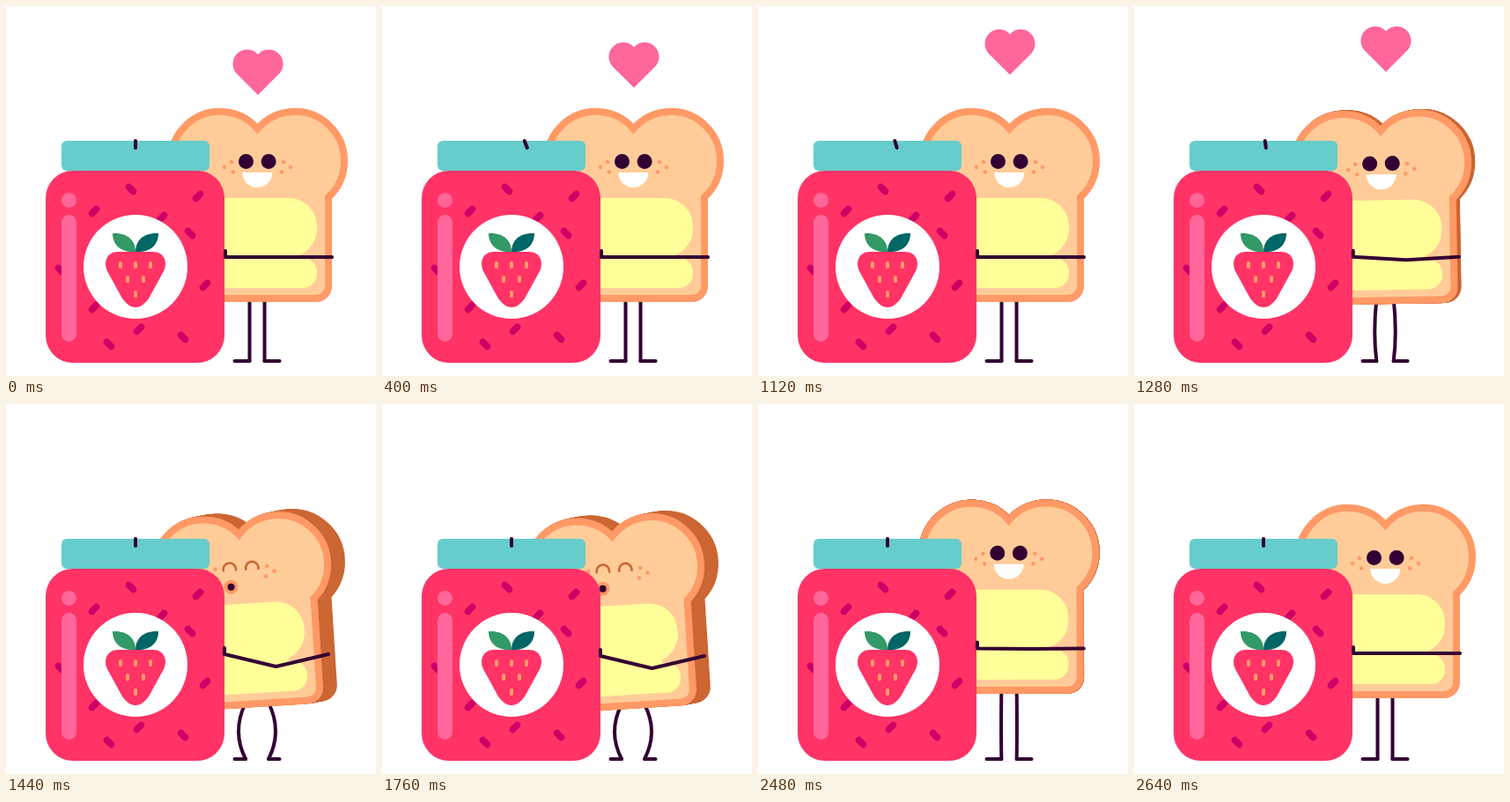
These frames come from a looping animation (420 by 420 pixels, 2.72 s). An HTML page with a canvas:

```html
<!DOCTYPE html>
<html lang="en">
<head>
<meta charset="utf-8">
<title>Toast loves jam</title>
<style>
  html, body { margin: 0; height: 100%; overflow: hidden; background: #fff; }
  canvas { display: block; width: 420px; height: 420px; }
</style>
</head>
<body>
<canvas id="stage" width="420" height="420"></canvas>
<script>
const ctx = document.getElementById('stage').getContext('2d');
const LOOP = 2720, STEP = 80;
const INK = '#330033', CRUST = '#ff9966', CRUMB = '#ffcc99', SIDE = '#cc6633',
      BUTTER = '#ffff99', JAM = '#ff3366', PINK = '#ff6699', SEED = '#cc0066';

const slice = new Path2D('M285.5 139.4A56 56 0 1 1 366 217V318a14 14 0 0 1-14 14H219a14 14 0 0 1-14-14V217A56 56 0 1 1 285.5 139.4Z');
const heart = new Path2D('M286 101L261.6 76.6A16.2 16.2 0 0 1 286 55A16.2 16.2 0 0 1 310.4 76.6Z');
const berry = new Path2D('M127 279H167C179 279 184 290 179 301L162 332Q155 342 147 342Q139 342 132 332L115 301C110 290 115 279 127 279Z');
const leafLeft = new Path2D('M121 258C138 257 147 266 147 279C131 280 121 272 121 258Z');
const leafRight = new Path2D('M173 258C156 257 147 266 147 279C163 280 173 272 173 258Z');

// time, lean, x, y, mouth shift, mouth radius
const POSES = [
  [0, 0, 0, 0, 0, 8],
  [1200, 0, 0, 0, 0, 8],
  [1440, 1, -21.5, 9, -12, 8],
  [1760, 1, -24.5, 11, -14, 8],
  [2320, 1, -23.5, 14.5, -9, 6.5],
  [2500, 0, 0, -8, 0, 6.5],
  [2640, 0, 0, -2, 0, 8],
  [2720, 0, 0, 0, 0, 8]
];

function poseAt(t) {
  const i = POSES.findIndex(p => p[0] > t);
  const a = POSES[i - 1], b = POSES[i];
  const u = (t - a[0]) / (b[0] - a[0]), e = u * u * (3 - 2 * u);
  const [, lean, x, y, mouth, pout] = a.map((v, k) => v + (b[k] - v) * e);
  return { lean, x, y, mouth, pout };
}

function fill(color, path) {
  ctx.fillStyle = color;
  ctx.fill(path);
}

function dot(color, x, y, r) {
  ctx.fillStyle = color;
  ctx.beginPath();
  ctx.arc(x, y, r, 0, 2 * Math.PI);
  ctx.fill();
}

function box(color, x, y, w, h, r) {
  ctx.fillStyle = color;
  ctx.beginPath();
  ctx.roundRect(x, y, w, h, r);
  ctx.fill();
}

function line(color, width, ...points) {
  ctx.strokeStyle = color;
  ctx.lineWidth = width;
  ctx.lineCap = ctx.lineJoin = 'round';
  ctx.beginPath();
  points.forEach(([x, y]) => ctx.lineTo(x, y));
  ctx.stroke();
}

function drawLegs({ lean, y }) {
  for (const side of [-1, 1]) {
    const x = 285 + side * (8.5 + 4.5 * lean);
    line(INK, 4, [x, 403], [285 + side * 25.5, 403]);
    ctx.beginPath();
    ctx.moveTo(x, 330 + y);
    ctx.quadraticCurveTo(x + side * 16 * lean, 372, x, 403);
    ctx.stroke();
  }
}

function drawFace({ lean, mouth, pout }) {
  const kissing = lean > 0.5;
  for (const side of [-1, 1]) {
    for (const [dx, y] of [[29.5, 177], [37.5, 183], [27.5, 188.5]]) {
      dot(CRUST, 285.5 + side * dx, y, 2.3);
    }
    const eye = 285.3 + side * 12.8;
    if (kissing) {
      ctx.strokeStyle = SIDE;
      ctx.lineWidth = 2.6;
      ctx.lineCap = 'round';
      ctx.beginPath();
      ctx.arc(eye, 178, 7.2, Math.PI * 0.95, Math.PI * 2.05);
      ctx.stroke();
    } else {
      dot(INK, eye, 176.5, 8.5);
    }
  }
  if (kissing) {
    dot(CRUST, 285 + mouth, 198, pout);
    dot(INK, 285 + mouth, 198, pout - 4);
  } else {
    ctx.fillStyle = '#fff';
    ctx.beginPath();
    ctx.arc(285.3, 189, 17, 0, Math.PI);
    ctx.fill();
  }
}

function drawBread(pose) {
  const { lean, x, y } = pose;
  ctx.save();
  ctx.translate(285.5 + x, 134 + y);
  ctx.rotate(-0.063 * lean);
  ctx.translate(-285.5, -134);
  ctx.lineJoin = 'miter';
  ctx.lineWidth = 8;

  // thickness of the slice
  ctx.strokeStyle = SIDE;
  for (let i = 16; i > 0 && lean > 0; i--) {
    ctx.save();
    ctx.translate(i * lean, -i * 0.13 * lean);
    fill(SIDE, slice);
    ctx.stroke(slice);
    ctx.restore();
  }
  fill(CRUMB, slice);
  ctx.strokeStyle = CRUST;
  ctx.stroke(slice);

  box(BUTTER, 218, 218, 135, 67, 32);
  box(BUTTER, 218, 286, 135, 34, 16);
  ctx.fillRect(218, 240, 115, 60);
  drawFace(pose);
  ctx.restore();
}

function drawJar() {
  box(JAM, 45, 187, 203, 218, 31);
  box('#66cccc', 63, 153, 168, 34, 6);

  const seeds = [[142, 208, 1], [218, 216, -1], [100, 233, -1], [177, 240, -1], [209, 258, 1], [226, 317, -1],
                 [100, 342, -1], [151, 367, -1], [201, 376, 1], [117, 384, 1], [62, 300, 1]];
  for (const [x, y, slope] of seeds) {
    line(SEED, 7.5, [x - 2.5, y - 2.5 * slope], [x + 2.5, y + 2.5 * slope]);
  }
  dot(PINK, 71.5, 220.5, 8.5);
  box(PINK, 63, 237, 17, 144, 8.5);

  dot('#fff', 147, 296, 59);
  fill(JAM, berry);
  fill('#339966', leafLeft);
  fill('#006666', leafRight);
  for (const [x, y] of [[130, 294], [147, 294], [164, 294], [138, 310], [156, 310], [147, 327]]) {
    box(CRUST, x - 2, y - 4, 4, 8, 1.5);
  }
}

function drawArms({ lean, x, y }, t) {
  const level = 285 + y - 10 * lean;
  const hand = 249 - lean;
  line(INK, 4, [hand, level - 7], [hand, level], [310 - 3.5 * lean, level + 14 * lean], [370 - 4 * lean, level]);

  // other hand strokes the lid
  const u = Math.min(t / 1400, 1);
  const top = 147 + 12 * (1 - Math.cos(2 * Math.PI * u));
  line(INK, 4, [top, 153], [top + 4 * Math.sin(Math.PI * u), 161]);
}

function draw(t) {
  const pose = poseAt(t);
  ctx.clearRect(0, 0, 420, 420);
  if (t < 1440) {
    ctx.save();
    ctx.translate(0, -t * 0.0205);
    fill(PINK, heart);
    ctx.restore();
  }
  drawLegs(pose);
  drawBread(pose);
  drawJar();
  drawArms(pose, t);
}

function tick() {
  const t = performance.now() % LOOP;
  draw(Math.floor(t / STEP) * STEP);
  requestAnimationFrame(tick);
}
tick();
</script>
</body>
</html>
```
